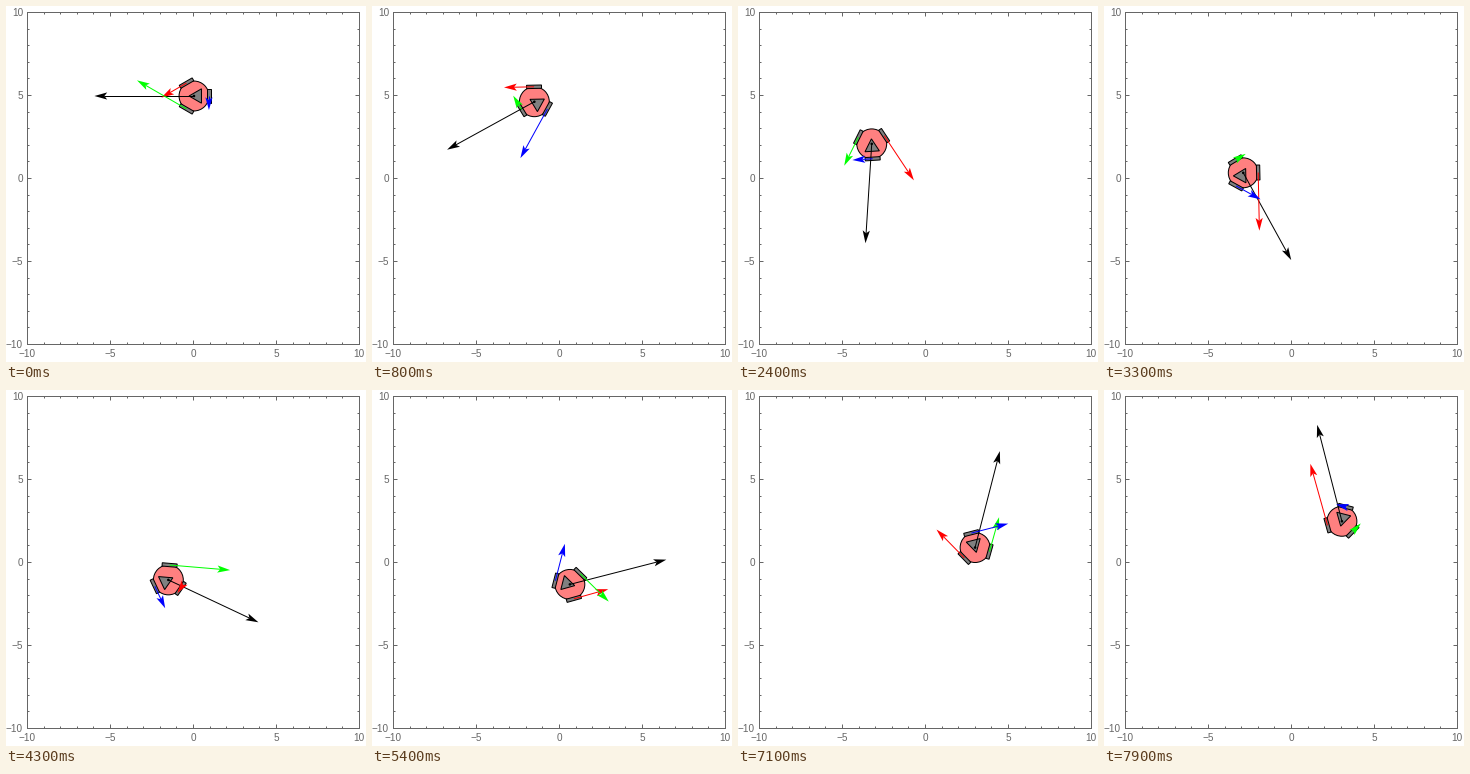
Write a matplotlib script that moves like this. It is 360 px wide and 356 px high and loops after 8000 ms.

```python
import numpy as np
import matplotlib.pyplot as plt
from matplotlib.animation import FuncAnimation
from matplotlib.patches import Circle, Polygon

DPI = 100
PX = 72 / DPI              # one pixel in points
WIDTH, HEIGHT, SIDE = 360, 356, 332
UNIT = SIDE / 20           # pixels per data unit
FRAMES, DT = 80, 0.1
SPEED, TURN = 2.0, np.pi / 5
RADIUS = 0.9
BODY_GAIN, WHEEL_GAIN = 3.0, 1.5
GRAY = "0.4"

plt.rcParams["font.family"] = "Liberation Sans"

# Forward Euler path: the heading turns left while the body spins right.
time = DT * np.arange(FRAMES)
heading = np.pi + TURN * time
spin = -TURN * time
velocity = SPEED * np.column_stack([np.cos(heading), np.sin(heading)])
path = np.array([0, 5]) + np.vstack([[0, 0], np.cumsum(velocity[:-1] * DT, axis=0)])


def unit(angle):
    return np.array([np.cos(angle), np.sin(angle)])


def place(points, angle, origin):
    c, s = np.cos(angle), np.sin(angle)
    return points @ np.array([[c, s], [-s, c]]) + origin


class Arrow:
    HEAD = np.array([[0, 0], [-12.8, 3.6], [-10, 0], [-12.8, -3.6]]) / UNIT
    NOTCH = 10 / UNIT

    def __init__(self, ax, color, z):
        self.line, = ax.plot([], [], color=color, lw=PX, zorder=z,
                             solid_capstyle="butt")
        self.head = Polygon(self.HEAD, fc=color, ec="none", zorder=z)
        ax.add_patch(self.head)

    def set(self, start, vec):
        length = np.hypot(*vec)
        angle = np.arctan2(vec[1], vec[0])
        end = start + unit(angle) * max(length - self.NOTCH, 0)
        self.line.set_data([start[0], end[0]], [start[1], end[1]])
        self.head.set_xy(place(self.HEAD, angle, start + vec))


fig = plt.figure(figsize=(WIDTH / DPI, HEIGHT / DPI), dpi=DPI, facecolor="white")


def panel(left, top):
    box = [left / WIDTH, 1 - (top + SIDE) / HEIGHT, SIDE / WIDTH, SIDE / HEIGHT]
    return fig.add_axes(box, xlim=(-10, 10), ylim=(-10, 10), autoscale_on=False)


# The frame lines sit on whole pixels, one step up and left of the scene.
frame = panel(21, 6)
for axis in (frame.xaxis, frame.yaxis):
    axis.set_ticks(range(-10, 11, 5))
    axis.set_ticks(range(-10, 11), minor=True)
frame.tick_params(which="both", direction="in", top=True, right=True,
                  width=PX, color=GRAY, labelcolor=GRAY, labelsize=10 * PX)
frame.tick_params(which="major", length=4 * PX, pad=3.9 * PX)
frame.tick_params(which="minor", length=2.5 * PX)
frame.tick_params(axis="x", which="major", pad=4.6 * PX)
for spine in frame.spines.values():
    spine.set(linewidth=PX, color=GRAY)

scene = panel(22, 7)
scene.axis("off")

WHEEL = np.array([[-0.1, -0.45], [0.1, -0.45], [0.1, 0.45], [-0.1, 0.45]])
half = np.sqrt(3) / 4
WEDGE = np.array([[-0.3, 0], [0.45, half], [0.45, -half]])
MOUNTS = np.radians([120, 240, 0])


def solid(points, z):
    return scene.add_patch(Polygon(points, fc="0.5", ec="black", lw=PX, zorder=z,
                                   joinstyle="miter"))


def disc(radius, color, edge, z):
    return scene.add_patch(Circle((0, 0), radius, fc=color, ec=edge, lw=PX, zorder=z))


body = disc(RADIUS, "#ff8080", "black", 2)
wheels = [solid(WHEEL, 3) for _ in MOUNTS]
wedge = solid(WEDGE, 4)
hub = disc(1.3 / UNIT, "black", "none", 5)
course = Arrow(scene, "black", 5)
drives = [Arrow(scene, c, 6 + i) for i, c in enumerate(["#ff0000", "#00ff00", "#0000ff"])]


def update(i):
    pos, vel = path[i], velocity[i]
    body.center = hub.center = tuple(pos)
    wedge.set_xy(place(WEDGE, spin[i], pos))
    course.set(pos, BODY_GAIN * vel)
    for mount, wheel, drive in zip(MOUNTS, wheels, drives):
        angle = mount + spin[i]
        hinge = pos + RADIUS * unit(angle)
        tangent = unit(angle + np.pi / 2)
        rate = vel @ tangent - TURN * RADIUS
        wheel.set_xy(place(WHEEL, angle, hinge))
        drive.set(hinge, WHEEL_GAIN * rate * tangent)
    return []


anim = FuncAnimation(fig, update, frames=FRAMES, interval=1000 * DT,
                     repeat=True, repeat_delay=0)
plt.show()
```
